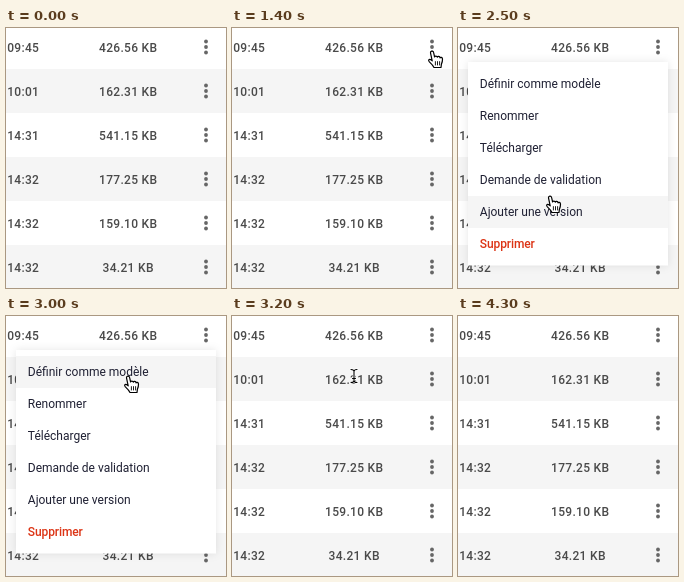
Recreate the animation shown at these times as an HTML page. Size 220 by 260 pixels, loop 5.7 s.

```html
<!DOCTYPE html>
<html lang="fr">
<head>
<meta charset="utf-8">
<style>
html, body { margin: 0; width: 100%; height: 100%; overflow: hidden; background: #fff; }
svg { display: block; width: 100vw; height: 100vh; font: 12px Roboto, Arial, sans-serif; }
#rows text { fill: #4a4a4a; font-weight: 500; letter-spacing: .3px; }
#menu text { fill: #1f2033; }
#menu .danger { fill: #dc3415; font-weight: 500; letter-spacing: -.1px; }
#box { fill: #fff; filter: drop-shadow(0 0 4px rgba(0,0,0,.1)); }
</style>
</head>
<body>
<svg viewBox="0 0 220 260">
  <rect width="220" height="260" fill="#fff"/>
  <g id="rows"></g>
  <g id="menu">
    <rect id="box" x="10" y="34" width="200" height="203.5"/>
    <rect id="hover" x="10" width="200" height="32" fill="#f5f5f5"/>
  </g>
  <g id="hand" stroke="#000" stroke-linejoin="round" stroke-linecap="round">
    <path fill="#fff" stroke-width="1.2" d="M-1.5 1.8C-1.6-.2 1.2-.4 1.6 1.5L2.6 6C2.8 4.8 5 4.6 5.3 6.2C5.8 5 7.8 5.2 8 6.8C8.6 5.9 10.4 6.3 10.5 8C10.6 10.6 10.2 11.5 9.4 13.2L9 16.5H2C1 14.4-.8 12.6-2.6 10.9C-4.2 9.3-3 7.8-1.4 8.6L.2 9.8Z"/>
    <path fill="none" stroke-width=".9" d="M3.4 10.6v3.4M5.5 10.6v3.4M7.6 10.6v3.4"/>
  </g>
  <g id="beam" fill="none" stroke-linecap="round">
    <path stroke="#fff" stroke-width="2.6" d="M-3-6.5Q0-6.5 0-4.5Q0-6.5 3-6.5M0-4.5V4.5M-3 6.5Q0 6.5 0 4.5Q0 6.5 3 6.5M-1.5 2.5H1.5"/>
    <path stroke="#000" stroke-width="1.1" d="M-3-6.5Q0-6.5 0-4.5Q0-6.5 3-6.5M0-4.5V4.5M-3 6.5Q0 6.5 0 4.5Q0 6.5 3 6.5M-1.5 2.5H1.5"/>
  </g>
</svg>
<script>
const LOOP = 5700, STEP = 100;
const $ = id => document.getElementById(id);

function add(parent, tag, attrs, text) {
  const el = document.createElementNS('http://www.w3.org/2000/svg', tag);
  for (const k in attrs) el.setAttribute(k, attrs[k]);
  if (text) el.textContent = text;
  parent.appendChild(el);
  return el;
}

const files = [
  ['09:45', '426.56 KB'], ['10:01', '162.31 KB'], ['14:31', '541.15 KB'],
  ['14:32', '177.25 KB'], ['14:32', '159.10 KB'], ['14:32', '34.21 KB']
];
const actions = ['Définir comme modèle', 'Renommer', 'Télécharger',
  'Demande de validation', 'Ajouter une version', 'Supprimer'];

let ripple;
files.forEach(([time, size], i) => {
  const y = 44 * i, rows = $('rows');
  if (i % 2) add(rows, 'rect', { y: y - 3, width: 220, height: 44, fill: '#f5f5f5' });
  add(rows, 'text', { x: 1.2, y: y + 24 }, time);
  add(rows, 'text', { x: 122.2, y: y + 24, 'text-anchor': 'middle' }, size);
  if (!i) ripple = add(rows, 'circle', { cx: 200, cy: 19, r: 16, fill: '#f5f5f5' });
  for (const d of [-5.5, 0, 5.5])
    add(rows, 'circle', { cx: 200, cy: y + 19 + d, r: 1.9, fill: '#666' });
});
actions.forEach((label, i) => add($('menu'), 'text',
  { x: 21.8, y: 60 + 32 * i, class: i === 5 ? 'danger' : '' }, label));

// pointer tip: time, x, y
const path = [
  [900, 210, 11.5], [1000, 203, 15], [1100, 198.5, 19], [1200, 196, 21.5],
  [1300, 196, 21.5], [1400, 200, 23], [2200, 200, 23], [2300, 189, 48],
  [2400, 152, 106], [2500, 92, 168], [2600, 51, 202], [2700, 68, 168],
  [2800, 102, 106], [2900, 120, 67], [3000, 122, 60], [3200, 122, 60]
];

function tipAt(t) {
  let i = 1;
  while (i < path.length - 1 && path[i][0] < t) i++;
  const [a, b] = [path[i - 1], path[i]];
  const p = (t - a[0]) / (b[0] - a[0]);
  return [a[1] + (b[1] - a[1]) * p, a[2] + (b[2] - a[2]) * p];
}

function place(el, shown, x, y) {
  el.style.display = shown ? '' : 'none';
  if (shown) el.setAttribute('transform', `translate(${x} ${y})`);
}

function draw(ms) {
  const t = Math.floor(ms % LOOP / STEP) * STEP;
  const [x, y] = tipAt(t);
  place($('hand'), t >= 900 && t < 3200, x, y);

  const drop = Math.max(0, (t - 3500) / 700) ** 1.6;
  place($('beam'), t >= 3200 && t < 4300, 122 + 7 * drop, 60 + 176 * drop);

  const open = t >= 2000 && t < 3200;
  $('menu').style.display = open ? '' : 'none';
  $('menu').setAttribute('opacity', t === 3100 ? .5 : 1);
  const item = Math.floor((y - 40) / 32);
  $('hover').style.display = item >= 0 && item < 6 ? '' : 'none';
  $('hover').setAttribute('y', 40 + 32 * item);

  ripple.setAttribute('opacity', t >= 2000 && t < 2300 ? 1 - (t - 2000) / 300 : 0);
}

const start = performance.now();
function tick() {
  draw(performance.now() - start);
  requestAnimationFrame(tick);
}
tick();
</script>
</body>
</html>
```
